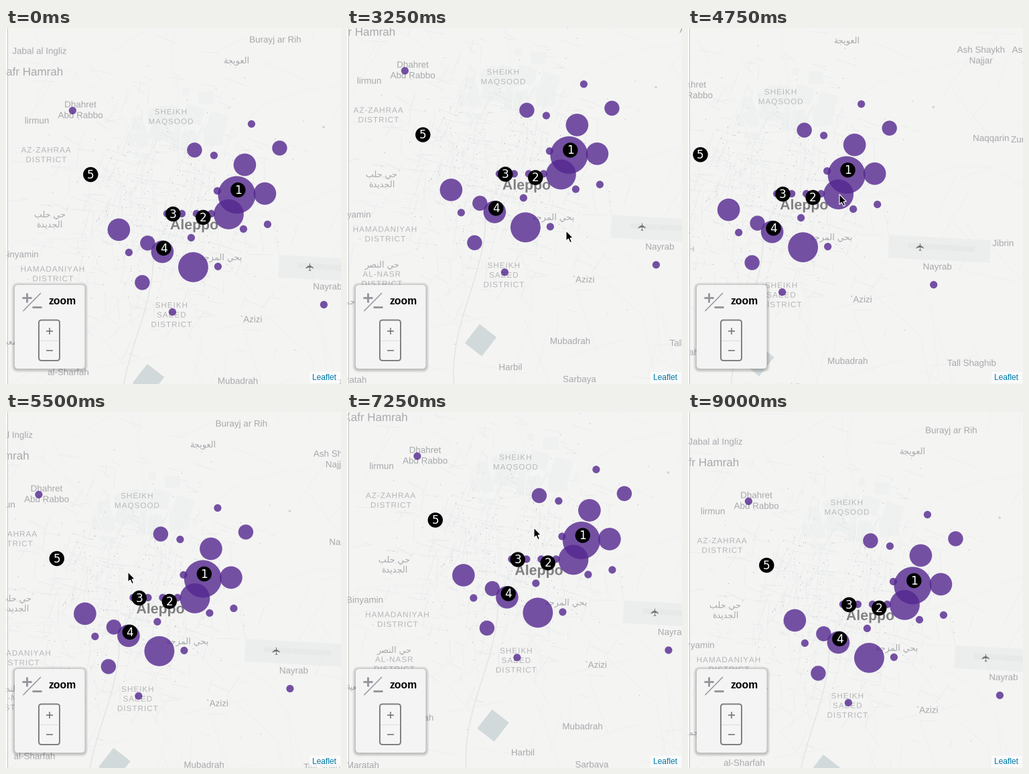
A matplotlib script for the animation above (9.5 s loop, 500 px wide and 532 px high).

```python
import numpy as np
import matplotlib.pyplot as plt
import matplotlib.patheffects as pe
from matplotlib.animation import FuncAnimation
from matplotlib.collections import LineCollection
from matplotlib.patches import Circle, FancyBboxPatch, Polygon, Rectangle

W, H, STEP, FRAMES = 500, 532, 250, 38
PX = 0.72  # points per pixel at 100 dpi
UNIT = 5.6  # radius of the smallest data circle
LAND, TOWN, DISTRICT = "#f4f4f3", "#a7a9ab", "#b4b7b8"
SANS = ["Liberation Sans", "DejaVu Sans"]
HALO = [pe.withStroke(linewidth=1.6 * PX, foreground=LAND)]
CENTER = np.array([235, 270])

# tick, map offset, pointer tip
KEYS = np.array([
    (1, 0, 0, 241, 131),
    (7, -28, 101, 213, 231),
    (13, -13, -59.5, 327, 303),
    (16, -165, -59.5, 270, 258),
    (22, -50.5, 0, 182, 239),
    (29, 5.5, -57.5, 279, 173),
    (36, -9, 10, 265, 240),
])

# circle centres by level; the radius is level * UNIT
DATA = {
    5: [(344, 249)],
    4: [(332, 278), (279, 357)],
    3: [(386, 247), (356, 204), (168, 301), (233, 334)],
    2: [(408, 179), (281, 182), (211, 321), (203, 380)],
    1: [(366, 143), (310, 190), (99, 123), (183, 335), (316, 356), (276, 313),
        (248, 424), (354, 300), (390, 293), (474, 413), (315, 243)]
       + [(240 + 22 * k, 277) for k in range(4)],
}
MARKERS = [(346, 242), (294, 283), (249, 278), (235, 329), (126, 219)]

TOWNS = {
    "Jabal al Ingliz": (50, 34), "Burayj ar Rih": (402, 17), "Handarat": (264, -68),
    "Haylan": (433, -63), "Ash Shaykh\nNajjar": (545, 62),
    "Ash Shaykh\nZayyat": (627, 62), "Dhahret\nAbd Rabbo": (111, 114),
    "lirmun": (46, 138), "Binyamin": (21, 338), "`Azizi": (366, 435),
    "Nayrab": (480, 386), "Mubadrah": (346, 527), "al-Sharfah": (93, 514),
    "Harbil": (257, 566), "Sarbaya": (360, 584), "Maratah": (18, 585),
    "Tall Shaghib": (531, 530), "Naqqarin": (560, 194), "Zurzur": (609, 196),
    "Jibrin": (578, 351), "Duwayr": (642, 335),
}
BIG_TOWNS = {"Kafr Hamrah": (37, 65), "Hraytan —": (20, -74), "Anadan": (24, -53)}
DISTRICTS = {
    "SHEIKH\nMAQSOOD": (246, 125), "AZ-ZAHRAA\nDISTRICT": (60, 182),
    "HAMADANIYAH\nDISTRICT": (70, 360), "SHEIKH\nSAEED\nDISTRICT": (247, 414),
    "AL-NASR\nDISTRICT": (65, 427),
}
# shaped letter forms in reading order
ARABIC = {
    "\ufe8d\ufedf\ufecc\ufeee\ufef3\ufea0\ufe94": (344, 48),
    "\ufea3\ufef2 \ufea3\ufee0\ufe90\n\ufe8d\ufedf\ufea0\ufeaa\ufef3\ufeaa\ufe93":
        (65, 278),
    "\ufea3\ufef2 \ufe8d\ufedf\ufee8\ufebc\ufeae": (65, 413),
    "\ufe91\ufea4\ufef2 \ufe8d\ufedf\ufee4\ufeae\ufe9f\ufe94": (321, 342),
    "\ufe9f\ufee4\ufecc\ufef4\ufe94": (9, 469),
}

fig = plt.figure(figsize=(W / 100, H / 100), dpi=100, facecolor="white")


def layer(z):
    ax = fig.add_axes([0, 0, 1, 1], zorder=z)
    ax.set(xlim=(0, W), ylim=(H, 0))
    ax.axis("off")
    return ax


world, hud = layer(1), layer(2)


def label(ax, s, x, y, size, color, **kw):
    kw = {"family": SANS, "ha": "center", "clip_on": True, **kw}
    ax.text(x, y + 0.35 * size, s, fontsize=size * PX, color=color,
            va="baseline", **kw)


def labels(group, size, color, leading, shape=str, **kw):
    for text, (x, y) in group.items():
        for row, line in enumerate(text.split("\n")):
            label(world, shape(line), x, y + row * leading, size, color, **kw)


def stroke(ax, pts, color, width, **kw):
    ax.plot(*zip(*pts), color=color, lw=width * PX, solid_capstyle="butt", **kw)


def sign(x, y, r, color, width, plus):
    stroke(hud, [(x - r, y), (x + r, y)], color, width)
    if plus:
        stroke(hud, [(x, y - r), (x, y + r)], color, width)


def box(x, y, w, h, r, **kw):
    hud.add_patch(FancyBboxPatch((x, y), w, h, **kw,
                                 boxstyle=f"round,pad=0,rounding_size={r}"))


def segments(mid, angle, length, color, width=0.9):
    half = np.column_stack([np.cos(angle), np.sin(angle)]) * length[:, None] / 2
    lines = np.stack([mid - half, mid + half], axis=1)
    world.add_collection(LineCollection(lines, colors=color, linewidths=width * PX,
                                        zorder=1), autolim=False)


def draw_land():
    rng = np.random.default_rng(4)
    world.add_patch(Rectangle((-300, -300), 1300, 1300, color=LAND, zorder=0))

    # pale blocks north of the centre, the airport and the reservoir
    for x, y in rng.normal((240, 135), (32, 22), (28, 2)):
        world.add_patch(Rectangle((x, y), *rng.uniform(8, 30, 2), color="#eff1f1",
                                  angle=rng.uniform(-25, 25), lw=0, zorder=0.5))
    for x, y, w, h, tilt, color in [(408, 339, 152, 34, 3, "#eceeee"),
                                    (436, 351, 100, 8, 3, "#e7e9e9"),
                                    (211, 502, 32, 36, 38, "#d2d9da")]:
        world.add_patch(Rectangle((x, y), w, h, angle=tilt, color=color, lw=0,
                                  zorder=0.6))

    n = 110
    mid = rng.uniform((-60, -130), (700, 620), (n, 2))
    segments(mid, rng.uniform(0, np.pi, n), rng.uniform(30, 110, n), "#eeefee")
    n = 420
    mid = rng.normal(CENTER, 85, (n, 2))
    turn = 0.25 + rng.integers(0, 2, n) * np.pi / 2 + rng.normal(0, 0.2, n)
    segments(mid, turn, rng.uniform(8, 36, n), "#e9ecec")

    # main roads wind outwards from the centre
    reach = np.linspace(20, 520, 40)
    for k in range(9):
        a = 2 * np.pi * k / 9 + 0.12 * np.sin(reach / 60 + k)
        road = CENTER + np.column_stack([np.cos(a), np.sin(a)]) * reach[:, None]
        stroke(world, road, "#e9ebeb", 2.6, zorder=1.2)
        stroke(world, road, "#fafafa", 1.3, zorder=1.3)
    y = np.linspace(310, 620, 40)
    rail = np.column_stack([196 + 24 * np.cos((y - 340) / 75), y])
    stroke(world, rail, "#e1e4e4", 1.3, zorder=1.3)

    dots = rng.normal(CENTER, 80, (180, 2))
    world.scatter(*dots.T, s=0.6, c="#9fa9b6", lw=0, zorder=1.5)
    world.add_patch(Circle((474, 148), 1.8, color="#d2d4d4", lw=0, zorder=1.5))


def draw_labels():
    labels(TOWNS, 13.4, TOWN, 16, path_effects=HALO)
    labels(BIG_TOWNS, 17, TOWN, 20, path_effects=HALO)
    labels(DISTRICTS, 11.7, DISTRICT, 14.4, "\u200a".join, path_effects=HALO)
    labels(ARABIC, 12.7, TOWN, 15, lambda s: s[::-1], family="DejaVu Sans")
    label(world, "Aleppo", 281, 293.5, 21.3, "#808082", weight="bold",
          path_effects=HALO)
    world.text(455, 356, "\u2708", fontsize=16 * PX, color="#6c6e70", rotation=90,
               family="DejaVu Sans", ha="center", va="center", clip_on=True)


def draw_data():
    for level, spots in DATA.items():
        for spot in spots:
            world.add_patch(Circle(np.add(spot, 0.4), level * UNIT, fc="#54278f",
                                   alpha=0.8, lw=0, zorder=4))
    for n, (x, y) in enumerate(MARKERS, 1):
        world.add_patch(Circle((x + 0.3, y), 2 * UNIT, color="black", lw=0, zorder=5))
        label(world, str(n), x + 0.3, y, 17, "white", family="DejaVu Sans", zorder=6)


def draw_hud():
    x, y, w, h = 13, 384, 104.5, 125
    for g in np.arange(7, 0, -1) * 0.7:
        box(x - g, y - g + 1, w + 2 * g, h + 2 * g, 5 + g, fc="black", alpha=0.032,
            lw=0)
    box(x, y, w, h, 5, fc="#f4f4f4", lw=0)

    gray = "#97979d"
    sign(31, 402.5, 7, gray, 3, True)
    sign(46, 417, 7, gray, 3, False)
    stroke(hud, [(25.5, 423), (52, 396)], gray, 1.5)
    label(hud, "zoom", 84.5, 407.5, 15.8, "black", weight="bold")

    box(49, 436.5, 31, 60.5, 4, fc="#f5f5f5", ec="#808080", lw=2 * PX)
    stroke(hud, [(50, 466.5), (79, 466.5)], "#dcdcdc", 1)
    sign(65, 453, 5, "#6c6c6c", 1.5, True)
    sign(65, 482, 5, "#6c6c6c", 1.5, False)

    hud.add_patch(Rectangle((453, 514), 46, 17, fc="white", alpha=0.7, lw=0))
    label(hud, "Leaflet", 475, 521.5, 12, "#0078a8")

    hud.add_patch(Rectangle((0, 0), 1, H, fc="white", lw=0))
    hud.add_patch(Rectangle((1.5, -2), W - 2, H + 1.5, fill=False, ec="#c8c8c8",
                            lw=PX))


draw_land()
draw_labels()
draw_data()
draw_hud()

ARROW = 1.12 * np.array([(0, 0), (0, 13.5), (3.1, 10.7), (5.3, 15.8), (7.6, 14.8),
                         (5.4, 9.8), (9.3, 9.6)])
pointer = hud.add_patch(Polygon(ARROW, fc="black", ec="white", lw=1.1 * PX, zorder=9))


def pose(i):
    """Map offset and pointer tip, eased from one key to the next."""
    ticks = KEYS[:, 0]
    i = np.clip(i, ticks[0], ticks[-1])
    k = min(np.searchsorted(ticks, i, side="right") - 1, len(KEYS) - 2)
    u = (i - ticks[k]) / (ticks[k + 1] - ticks[k])
    u = u * u * (3 - 2 * u)
    return KEYS[k, 1:] * (1 - u) + KEYS[k + 1, 1:] * u


def update(i):
    dx, dy, px, py = pose(i)
    world.set_xlim(-dx, W - dx)
    world.set_ylim(H - dy, -dy)
    pointer.set_xy(ARROW + (px, py))
    pointer.set_visible(2 <= i < 36)
    return ()


anim = FuncAnimation(fig, update, frames=FRAMES, interval=STEP, repeat=True,
                     repeat_delay=0, blit=False)
plt.show()
```
